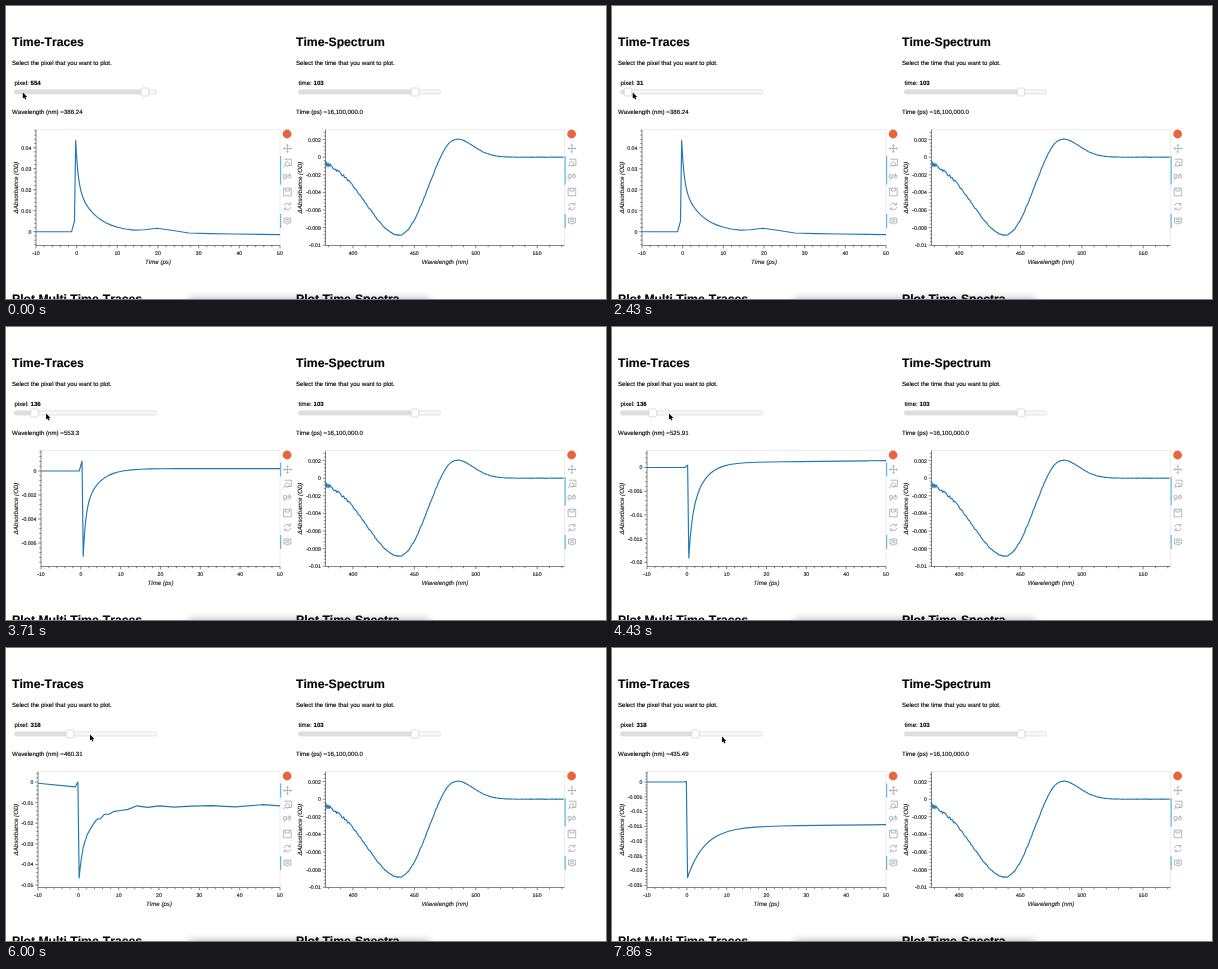
Animation, 600 px wide and 293 px high, one loop 8 s. Source, as an HTML page:

```html
<!DOCTYPE html>
<html lang="en">
<head>
<meta charset="utf-8">
<title>Time traces</title>
<style>
html, body { margin: 0; width: 100%; height: 100%; overflow: hidden; background: #fff; }
svg { display: block; width: 100%; height: 100%; }
text {
  font-family: "Liberation Sans", Arial, sans-serif; font-size: 6.14px; font-kerning: none;
  fill: #000; stroke: #000; stroke-width: .12; text-rendering: geometricPrecision; white-space: pre;
}
.title { font-size: 12.2px; font-weight: bold; }
.bold { font-weight: bold; }
.axis { font-style: italic; fill: #222; text-anchor: middle; }
.tick { font-size: 5.2px; fill: #222; }
.icon { fill: none; stroke: #a1a6a9; stroke-width: .8; }
.curve { fill: none; stroke: #1f77b4; stroke-width: 1.15; stroke-linejoin: round; }
</style>
</head>
<body>
<svg id="stage" viewBox="0 0 600 293">
  <defs>
    <filter id="blur" x="-20%" y="-200%" width="140%" height="500%"><feGaussianBlur stdDeviation="4"/></filter>
  </defs>
</svg>
<script>
const LOOP = 8000, STEP = 1000 / 7, LAG = 4 * STEP, TOP = 123.5, BOTTOM = 239.5;
const stage = document.getElementById('stage');

function add(parent, tag, attrs = {}, text) {
  const el = document.createElementNS('http://www.w3.org/2000/svg', tag);
  for (const k in attrs) el.setAttribute(k, attrs[k]);
  if (text !== undefined) el.textContent = text;
  return parent.appendChild(el);
}
const label = (parent, x, y, cls, text, more) => add(parent, 'text', { x, y, class: cls, ...more }, text);

let seed = 7;
const noise = () => (seed = seed * 16807 % 2147483647) / 2147483647 - .5;
const clamp = v => Math.min(1, Math.max(0, v));
const ease = p => p * p * (3 - 2 * p);

function column(x, title, next, noun, info) {
  label(stage, x, 39.8, 'title', title);
  label(stage, x, 297.2, 'title', next);
  label(stage, x, 58.8, '', `Select the ${noun} that you want to plot.`);
  return label(stage, x, 107.7, '', info);
}
const wave = column(6, 'Time-Traces', 'Plot Multi Time-Traces', 'pixel', '');
column(290, 'Time-Spectrum', 'Plot Time-Spectra', 'time', 'Time (ps) =16,100,000.0');

function slider(x, name, value) {
  const text = label(stage, x, 78.8, '', name + ': ');
  const number = add(text, 'tspan', { class: 'bold' }, value);
  add(stage, 'rect', { x, y: 83.8, width: 142, height: 4.2, rx: 1.6, fill: '#f7f7f7', stroke: '#d6d6d6', 'stroke-width': .6 });
  const fill = add(stage, 'rect', { x, y: 83.9, height: 4, rx: 1.5, fill: '#dedede' });
  const knob = add(stage, 'rect', { y: 82, width: 7.6, height: 8, rx: 1.6, fill: '#fff', stroke: '#cfcfcf', 'stroke-width': .7 });
  const move = at => {
    fill.setAttribute('width', at - x);
    knob.setAttribute('x', at - 3.8);
  };
  return { number, move };
}
const pixel = slider(8.5, 'pixel', '');
slider(292.5, 'time', '103').move(409);

function toolbar(parent, x, panning) {
  const g = add(parent, 'g', { transform: `translate(${x} 0)` });
  add(g, 'circle', { cx: -.3, cy: 128, r: 4.4, fill: '#e8643c' });
  [
    'M-4 0H4M0-4V4M-2.8-1.2L-4 0L-2.8 1.2M2.8-1.2L4 0L2.8 1.2M-1.2-2.8L0-4L1.2-2.8M-1.2 2.8L0 4L1.2 2.8',
    'M-3-3.8H4V2.5H0M-1.8-.6a2.2 2.2 0 1 0 3.2 0a2.2 2.2 0 0 0-3.2 0M-1.8 2.2L-4.2 4',
    'M-3.8-2.8h3v3h-3zM-3.8 2.8L-1.6 .4M.8-2.2a1.5 2 0 1 0 2.6 0a1.5 2 0 0 0-2.6 0M2.1-4V-1',
    'M-3.8-3.8H3.8V3.8H-3.8zM-2-3.6V-1H2V-3.6',
    'M-3.4-.6a3.4 3.2 0 0 1 6-1.4M3.4 .6a3.4 3.2 0 0 1-6 1.4M3-4V-1.6H.8M-3 4V1.6H-.8',
    'M-3.4-3H3.4V2H1L0 3.4L-1 2H-3.4zM-2-1.3H2M-2 .3H2'
  ].forEach((d, i) => add(g, 'path', { d, class: 'icon', transform: `translate(0 ${142.5 + 14.5 * i})` }));
  const bar = (y, height) => add(g, 'rect', { x: -7.3, y, width: 1.1, height, fill: '#4fb4e4' });
  panning ? bar(135.5, 14) : bar(150, 28.5);
  bar(208, 14);
}

// x and y scales: [pixel of zero, pixels per major tick, value per major tick]
function plot({ left, right, x, y, name, points, panning }) {
  const g = add(stage, 'g');
  add(g, 'path', { d: `M${left} ${TOP}H${right}V${BOTTOM}`, fill: 'none', stroke: '#e5e5e5', 'stroke-width': .7 });
  let ticks = `M${left} ${TOP}V${BOTTOM}H${right}`;
  const each = ([zero, gap, unit], from, to, draw) => {
    const a = (from - zero) / gap * 5, b = (to - zero) / gap * 5;
    for (let i = Math.ceil(a - .05); i <= b + .05; i++)
      draw(zero + i * gap / 5, i % 5 === 0, String(+(i / 5 * unit).toFixed(4) || 0));
  };
  each(x, left, right, (p, major, text) => {
    ticks += `M${p} ${BOTTOM}v${major ? 2.8 : 1.7}`;
    if (major) label(g, p, 248.7, 'tick', text, { 'text-anchor': 'middle' });
  });
  each([y[0], y[1], -y[2]], TOP, BOTTOM, (p, major, text) => {
    ticks += `M${left} ${p}h${major ? -2.8 : -1.7}`;
    if (major) label(g, left - 4.6, p + 1.9, 'tick', text, { 'text-anchor': 'end' });
  });
  add(g, 'path', { d: ticks, fill: 'none', stroke: '#333', 'stroke-width': .6 });
  const place = ([a, b]) => [x[0] + a / x[2] * x[1], y[0] - b / y[2] * y[1]].map(v => v.toFixed(2));
  add(g, 'path', { d: 'M' + points.map(place).join('L'), class: 'curve' });
  label(g, (left + right) / 2, 257.8, 'axis', name);
  label(g, 0, 0, 'axis', 'ΔAbsorbance (OD)', { transform: `translate(${right < 300 ? 12 : 296} 181.5) rotate(-90)` });
  toolbar(g, right + 7.4, panning);
  return g;
}

// Kinetics in mOD: a lead-in, a spike, then two exponential decays towards a drifting rest level
function kinetics({ start, lead = 0, spike, fast, slow, rest, drift = 0, bump = 0, rough = 0 }) {
  const decay = ([amp, tau], s) => amp * Math.exp(-s / tau);
  const points = [[-10, lead / 4], [start - 1, lead], [start - .3, spike]];
  const grow = 1.18;
  for (let s = 0; s < 50; s = Math.max(.1, s * grow)) {
    const t = Math.min(50, s + start);
    points.push([t, decay(fast, s) + decay(slow, s) + rest + drift * t
      + bump * Math.exp(-(((t - 20.5) / 4) ** 2)) + (s > 1 ? rough * noise() : 0)]);
  }
  points.push([50, rest + drift * 50]);
  return points.map(([t, v]) => [t, v / 1000]);
}

const traces = [
  { click: -1000, value: 554, wave: '386.24', left: 30, y: [225.7, 21, .01],
    start: -.24, spike: 5, fast: [21, .6], slow: [22.5, 4.6], rest: 0, drift: -.028, bump: 2 },
  { click: 2000, value: 31, wave: '553.3', left: 35, y: [144, 24, .002],
    start: .6, spike: .83, fast: [-3.6, .6], slow: [-3.7, 3.4], rest: .2 },
  { click: 3571, value: 136, wave: '525.91', left: 35, y: [140.5, 23.7, .005],
    start: .5, spike: .5, fast: [-7, .7], slow: [-13.1, 3.1], rest: 1, drift: .009 },
  { click: 5000, value: 235, wave: '460.31', left: 32, y: [134, 20.6, .01],
    start: .2, lead: -2.4, spike: 0, fast: [-15, .9], slow: [-20, 4.2], rest: -11.6, rough: 1.4 },
  { click: 6000, value: 318, wave: '435.49', left: 35, y: [134, 14.75, .005],
    start: .18, spike: .2, fast: [0, 1], slow: [-17.2, 4.4], rest: -15.2, drift: .015 }
];
traces.forEach((s, i) => {
  const gap = (274 - s.left) / 6;
  s.g = plot({ left: s.left, right: 274, x: [s.left + gap, gap, 10], y: s.y, name: 'Time (ps)', points: kinetics(s), panning: i > 0 });
});

// Bleach and absorption bands; the noise fades towards the red
function spectrum() {
  const band = (nm, amp, mid, blue, red) => amp * Math.exp(-(((nm - mid) / (nm < mid ? blue : red)) ** 2) / 2);
  const points = [];
  for (let nm = 377.2; nm < 572; nm += .8) {
    const rough = .5 * Math.exp((377 - nm) / 12) + (nm < 470 ? .13 : .03);
    points.push([nm, (band(nm, -8.85, 438, 27, 18.4) + band(nm, 2.47, 481, 11.5, 15) + rough * noise()) / 1000]);
  }
  return points;
}
plot({ left: 319.5, right: 558.5, x: [-144.2, 61.4, 50], y: [151.2, 17.6, .002], name: 'Wavelength (nm)', points: spectrum() });

add(stage, 'rect', { x: 182, y: 293, width: 242, height: 14, fill: '#000', opacity: .32, filter: 'url(#blur)' });
const cursor = add(stage, 'path', {
  d: 'M0 0V6.2L1.4 5L2.4 7.2L3.5 6.7L2.5 4.6H4.4Z', stroke: '#fff', 'stroke-width': .5, 'paint-order': 'stroke'
});

// Pointer stops: [time, x]
const stops = [[0, 16.8], [714, 15.5], [1857, 15.5], [3143, 28], [4430, 57], [5142, 64], [5860, 84], [7143, 84], [7857, 110], [LOOP, 110]];

const knobAt = value => 8.7 + .235 * value;
const lastIndex = (list, test) => list.reduce((found, item, i) => test(item) ? i : found, 0);

function render(time) {
  // The screen refreshes seven times a second
  const t = Math.floor((time + 4) / STEP) * STEP + 1;

  const shown = lastIndex(traces, s => s.click + LAG <= t);
  traces.forEach((s, i) => s.g.setAttribute('display', i === shown ? 'inline' : 'none'));
  wave.textContent = 'Wavelength (nm) =' + traces[shown].wave;

  const c = lastIndex(traces, s => s.click <= t);
  const to = traces[c], from = traces[Math.max(0, c - 1)];
  pixel.number.textContent = to.value;
  pixel.move(knobAt(from.value + (to.value - from.value) * ease(clamp((t - to.click - 3) / 280))));

  const i = lastIndex(stops, s => s[0] <= t);
  const [a, b] = [stops[i], stops[Math.min(i + 1, stops.length - 1)]];
  const x = a[1] + (b[1] - a[1]) * ease(clamp((t - a[0]) / (b[0] - a[0] || 1)));
  cursor.setAttribute('transform', `translate(${x} ${86.4 + 2 * clamp((x - 84) / 26)})`);
}

const begin = performance.now();
(function loop() {
  render((performance.now() - begin) % LOOP);
  requestAnimationFrame(loop);
})();
</script>
</body>
</html>
```
